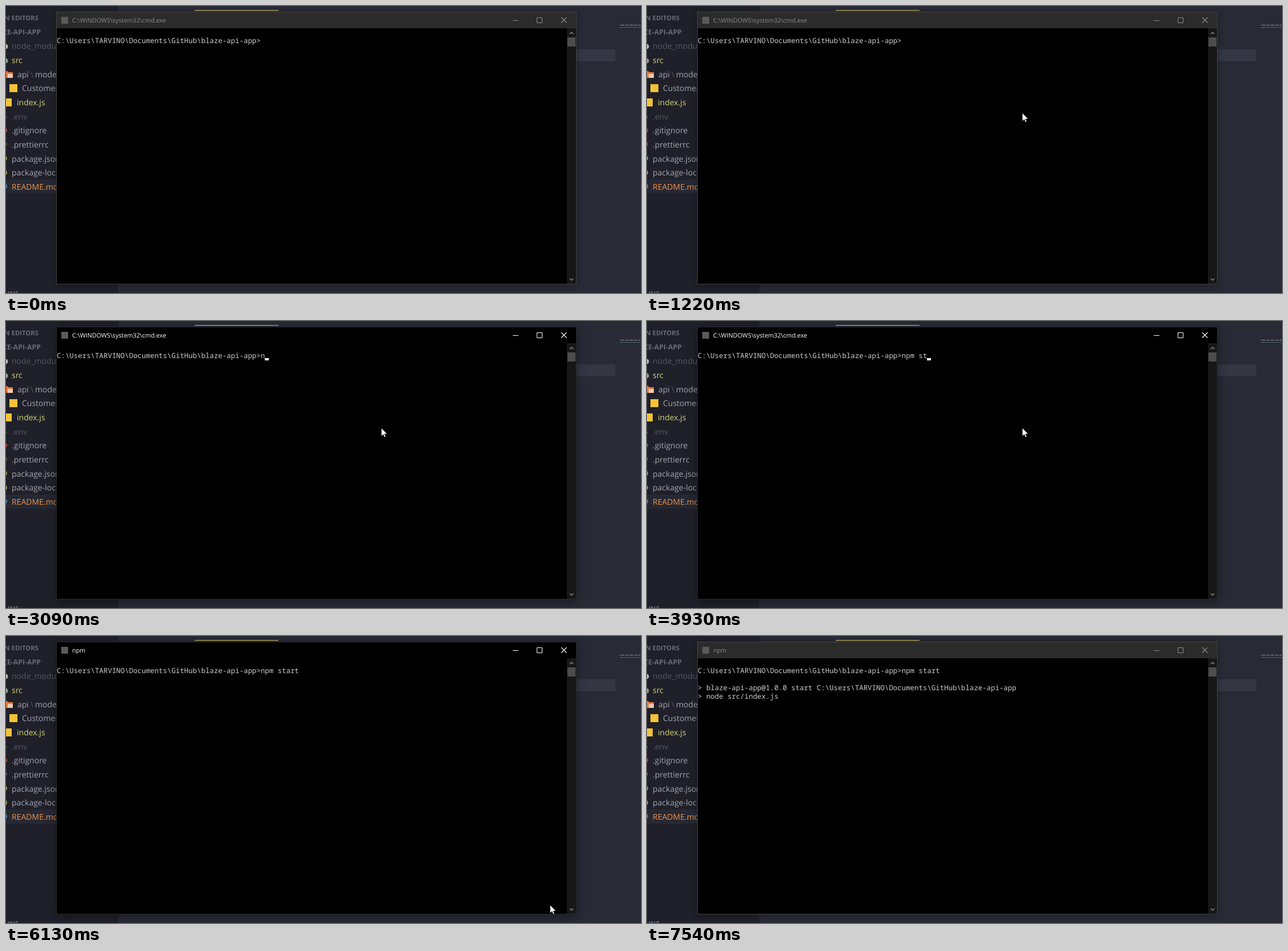
An HTML page for the animation above (8 s loop, 1114x503 px).

```html
<!DOCTYPE html>
<html lang="en">
<head>
<meta charset="utf-8">
<title>Terminal start</title>
<style>
  html, body { margin: 0; width: 100%; height: 100%; overflow: hidden; background: #282a36; }
  body { position: relative; text-rendering: geometricPrecision; }
  svg, .window, .console, .caret, .pointer, .click { position: absolute; }
  svg { left: 0; top: 0; overflow: visible; }
  text { white-space: pre; }

  .window, .frame, .caret, .typed, .output, .title, .click {
    animation: 8s step-end infinite;
  }

  /* Editor behind the window */
  .files { font: 14px "Open Sans", sans-serif; fill: #a3a4ad; }
  .heads { font: bold 11.3px "Open Sans", sans-serif; fill: #686a75; text-anchor: end; }
  .files .dim { fill: #555762; }
  .files .changed { fill: #d3d276; }
  .files .current { fill: #ee924c; }

  /* Window: inactive by default, active while focused */
  .window {
    box-sizing: border-box;
    left: 88px; top: 10px; width: 913px; height: 478px;
    border: 1px solid #434343;
    background: linear-gradient(#000, #000) 0 28px / 100% 100% no-repeat #2b2b2b;
    box-shadow: 0 2px 12px rgba(0, 0, 0, .32);
    animation-name: focus;
  }
  @keyframes focus {
    28.75% { background-color: #000; border-color: #2c2c2c; box-shadow: 0 3px 16px rgba(0, 0, 0, .4); }
    94.25% { background-color: #2b2b2b; border-color: #434343; box-shadow: 0 2px 12px rgba(0, 0, 0, .32); }
  }
  .frame { color: #8a8a8a; animation-name: brighten; }
  @keyframes brighten {
    28.75% { color: #fff; }
    94.25% { color: #8a8a8a; }
  }
  .title { font: 10.8px "Open Sans", sans-serif; fill: currentColor; }
  .shell { animation-name: shell; }
  .running { opacity: 0; animation-name: running; }
  .npm { opacity: 0; animation-name: npm; }
  @keyframes shell { 0% { opacity: 1; } 55.875%, 100% { opacity: 0; } }
  @keyframes running { 55.875% { opacity: 1; } 61%, 100% { opacity: 0; } }
  @keyframes npm { 61%, 100% { opacity: 1; } }

  /* Console text */
  .console {
    left: 89px; top: 53.9px;
    font: 12.43px/14.92px "Noto Sans Mono", monospace;
    color: #ccc;
  }
  .row { display: flex; height: 14.92px; white-space: pre; }
  .typed { width: 0; overflow: hidden; animation-name: type; }
  @keyframes type {
    38.625% { width: 1ch; }
    41.125% { width: 2ch; }
    43.75% { width: 3ch; }
    46% { width: 4ch; }
    47.5% { width: 5ch; }
    49.125% { width: 6ch; }
    51% { width: 7ch; }
    51.875% { width: 8ch; }
    53.875%, 100% { width: 9ch; }
  }
  .caret {
    left: 48ch; top: 11.1px; width: 1ch; height: 4px;
    background: #fff; opacity: 0;
    animation-name: caret;
  }
  @keyframes caret {
    0% { opacity: 0; left: 48ch; top: 11.1px; }
    35.75% { opacity: 1; left: 48ch; top: 11.1px; }
    38.625% { opacity: 1; left: 49ch; top: 11.1px; }
    41.125% { opacity: 1; left: 50ch; top: 11.1px; }
    42.375% { opacity: 0; left: 50ch; top: 11.1px; }
    43.75% { opacity: 1; left: 51ch; top: 11.1px; }
    46% { opacity: 1; left: 52ch; top: 11.1px; }
    47.5% { opacity: 1; left: 53ch; top: 11.1px; }
    49.125% { opacity: 1; left: 54ch; top: 11.1px; }
    51% { opacity: 1; left: 55ch; top: 11.1px; }
    51.875% { opacity: 1; left: 56ch; top: 11.1px; }
    53.875% { opacity: 1; left: 57ch; top: 11.1px; }
    54.875% { opacity: 1; left: 0; top: 26.1px; }
    62.375% { opacity: 0; left: 0; top: 26.1px; }
    68.375% { opacity: 1; left: 0; top: 26.1px; }
    75% { opacity: 0; left: 0; top: 26.1px; }
    81.5% { opacity: 1; left: 0; top: 26.1px; }
    87.75%, 100% { opacity: 0; left: 0; top: 26.1px; }
  }
  .output { opacity: 0; animation-name: output; }
  @keyframes output { 92.75%, 100% { opacity: 1; } }

  /* Mouse */
  .pointer { transform: translate(857px, 520px); animation: move 8s linear infinite; }
  @keyframes move {
    0%, 9.86% { transform: translate(857px, 520px); }
    9.875% { transform: translate(857px, 483px); }
    11.5% { transform: translate(765px, 345px); }
    13% { transform: translate(672px, 215px); }
    14% { transform: translate(648px, 193px); }
    15.25%, 72% { transform: translate(658px, 187px); }
    73.2% { transform: translate(715px, 240px); }
    75% { transform: translate(890px, 410px); }
    76.625%, 81.125% { transform: translate(954px, 471px); }
    85% { transform: translate(976px, 495px); }
    87%, 100% { transform: translate(976px, 520px); }
  }
  .click {
    left: 646.7px; top: 174.5px; width: 22.6px; height: 22.6px;
    border-radius: 50%; background: rgba(255, 255, 0, .5);
    opacity: 0; animation-name: click;
  }
  @keyframes click { 28.75% { opacity: 1; } 31.25%, 100% { opacity: 0; } }
</style>
</head>
<body>
<svg width="1114" height="503">
  <rect width="197" height="503" fill="#1f2029"/>
  <rect y="304" width="197" height="25" fill="#262833"/>
  <rect x="331" y="7" width="147" height="1.2" fill="#d8bd6a"/>
  <rect x="990" y="76" width="79" height="21" fill="#343643"/>
  <g fill="none" opacity=".75">
    <path d="M1077 33.5h36" stroke="#b9bac2" stroke-dasharray="2 1 5 2 4 1"/>
    <path d="M1077 37.5h36" stroke="#5e93a3" stroke-dasharray="6 1 3 1"/>
  </g>
  <g class="heads">
    <text x="57" y="25">OPEN EDITORS</text>
    <text x="61" y="50" font-size="12.3">BLAZE-API-APP</text>
    <text x="22" y="508">OUTLINE</text>
  </g>
  <g>
    <circle cx="-1" cy="71" r="4.5" fill="#b9b6ac"/>
    <circle cx="-1" cy="96" r="4.5" fill="#8fa08c"/>
    <path d="M-4 114h6l2 2h8v10H-4z" fill="#e8743b"/>
    <path d="M3 119h9v7H3z" fill="#f3c9b0"/>
    <rect x="6" y="137" width="14" height="14" fill="#f5c237"/>
    <rect x="-4" y="162" width="14" height="14" fill="#f5c237"/>
    <circle cx="-1" cy="195" r="2" fill="#8d8752"/>
    <circle cx="-2" cy="218" r="4" fill="#b5473c"/>
    <circle cx="-2" cy="242" r="3.5" fill="#8a6258"/>
    <circle cx="-4" cy="267" r="5" fill="none" stroke="#c5b650" stroke-width="1.5"/>
    <circle cx="-4" cy="292" r="5" fill="none" stroke="#c5b650" stroke-width="1.5"/>
    <circle cx="-4" cy="316" r="5" fill="none" stroke="#4f9fc4" stroke-width="1.5"/>
  </g>
  <g class="files">
    <text class="dim" x="10" y="75">node_modules</text>
    <text class="changed" x="10" y="100">src</text>
    <text x="20" y="124.5">api<tspan class="dim" dx="3">\</tspan><tspan dx="3">models</tspan></text>
    <text x="28" y="149">Customer.js</text>
    <text class="changed" x="19" y="173.5">index.js</text>
    <text class="dim" x="10" y="198.5">.env</text>
    <text x="10" y="223">.gitignore</text>
    <text x="10" y="247.5">.prettierrc</text>
    <text x="10" y="272.5">package.json</text>
    <text x="10" y="297">package-lock.json</text>
    <text class="current" x="10" y="321.5">README.md</text>
  </g>
</svg>

<div class="window"></div>

<svg class="frame" width="1114" height="503">
  <rect x="97" y="19" width="12" height="12" fill="#5a5a5a"/>
  <text class="title shell" x="116" y="29">C:\WINDOWS\system32\cmd.exe</text>
  <text class="title running" x="116" y="29">C:\WINDOWS\system32\cmd.exe - npm  start</text>
  <text class="title npm" x="116" y="29">npm</text>
  <g fill="none" stroke="currentColor">
    <path d="M889 25.5h10M931.5 20.5h9v9h-9z"/>
    <path d="M974 20l9.5 9.5M983.5 20L974 29.5" stroke-width="1.1"/>
  </g>
  <rect x="984" y="39" width="16" height="448" fill="#171717"/>
  <rect x="985" y="55" width="14" height="16" fill="#4d4d4d"/>
  <path d="M989 49.2l3.2-3.2 3.2 3.2M989 477.5l3.2 3.2 3.2-3.2" fill="none" stroke="#858585" stroke-width="1.5"/>
</svg>

<div class="console">
  <div class="row"><span>C:\Users\TARVINO\Documents\GitHub\blaze-api-app&gt;</span><span class="typed">npm start</span></div>
  <div class="output">
    <div class="row"></div>
    <div class="row">&gt; blaze-api-app@1.0.0 start C:\Users\TARVINO\Documents\GitHub\blaze-api-app</div>
    <div class="row">&gt; node src/index.js</div>
  </div>
  <div class="caret"></div>
</div>

<svg class="pointer" width="12" height="18">
  <path d="M.5 .5v14.4l3.3-3.1 2.2 5 2.2-1-2.2-4.8h4.6z" fill="#fff" stroke="#000" stroke-width=".6"/>
</svg>
<div class="click"></div>
</body>
</html>
```
